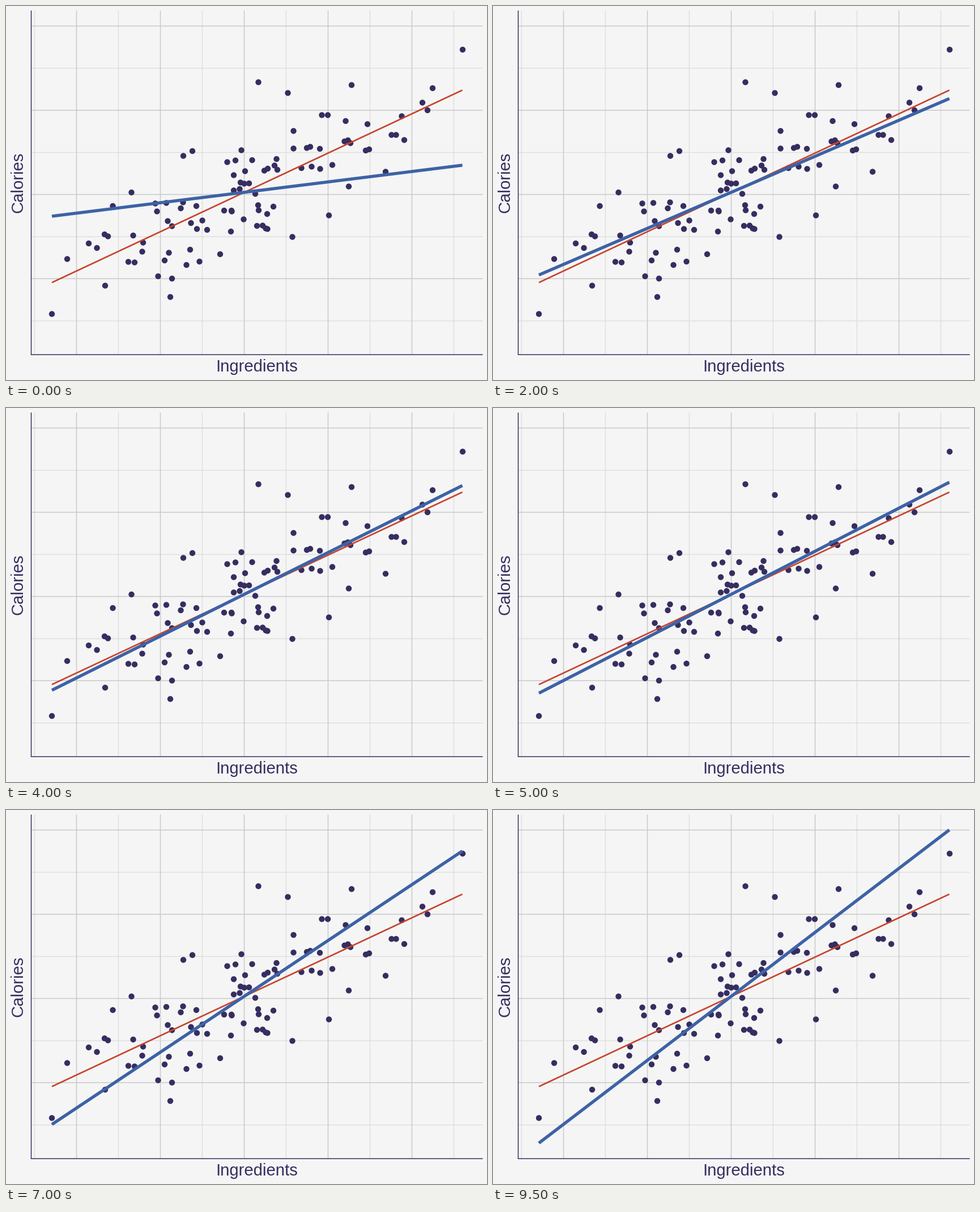
Write a matplotlib script that moves like this. It is 849 by 660 pixels and loops after 10000 ms.

```python
import matplotlib.pyplot as plt
from matplotlib.animation import FuncAnimation
from matplotlib.collections import PatchCollection
from matplotlib.patches import Circle

W, H, DPI = 849, 660, 72  # at 72 dpi one point is one pixel
PAPER, INK = "#f5f5f5", "#362d60"
MAJOR, MINOR = "#c9c9c9", "#dedede"
RED, BLUE = "#c8442e", "#3d62a6"

LEFT, RIGHT, TOP, BOTTOM = 44.5, 841.5, 8, 615.3
X0, X1 = 81, 805.5
PIVOT = 420.5, 328.8

# height of the blue line's right end at each step
STEPS = [281, 207.2, 191, 176.3, 163.4, 161.9, 153.9, 151.3, 136.9, 134.2,
         131, 131, 127.8, 86.8, 72.4, 67.7, 62.8, 41.5, 36.7, 35.1]

LOW = [
    (81, 543.5), (108, 446.5), (146, 419), (160.5, 427), (174, 403),
    (180, 406.5), (175, 493.5), (188.5, 353), (221.5, 329), (216, 451.5),
    (227, 452.5), (224.5, 405), (242, 417.5), (240.5, 433.5), (263.5, 348.5),
    (266.5, 362.5), (283, 347.5), (285.5, 379.5), (293, 388.5),
    (287.5, 435.5), (280, 449), (268.5, 477), (293, 481), (290, 513.5),
    (308.5, 357), (312.5, 346.5), (313, 264.5), (329, 256), (326.5, 383),
    (325, 430), (318.5, 457), (341.5, 451), (336, 353), (337, 393.5),
    (346.5, 378.5), (355, 395), (378, 438),
]
MID = [
    (385, 361), (398, 361), (398.5, 362.5), (397, 398), (390.5, 275.5),
    (405, 272.5), (402, 298.5), (402, 325.5), (412.5, 323), (414, 311.5),
    (420.5, 313.5), (429, 313), (422, 291.5), (415.5, 254.5), (434.5, 272),
    (440, 331.5), (445, 351.5), (446, 360.5), (419.5, 376.5), (443, 388),
    (453, 387.5), (458.5, 392.5), (461.5, 393.5), (461, 367), (472, 354),
    (456, 290.5), (462, 287), (474, 281.5), (477.5, 270), (479, 289),
    (445.5, 134.5), (497.5, 153.5), (505.5, 407.5), (507.5, 220.5),
    (507.5, 251.5), (521.5, 286), (531, 250.5), (537, 248.5),
    (539.5, 283.5), (554, 252), (554.5, 287.5),
]
HIGH = [
    (557.5, 192.5), (568, 192.5), (570, 369.5), (576, 280.5), (599.5, 203),
    (597.5, 239), (603.5, 237), (608, 242), (605, 318.5), (610, 139.5),
    (638, 208.5), (635, 255), (641, 253), (670, 292.5), (680.5, 227.5),
    (688.5, 227.5), (698.5, 194.5), (703, 236.5), (735, 170.5), (744, 184),
    (753, 145), (806, 77),
]

fig = plt.figure(figsize=(W / DPI, H / DPI), dpi=DPI, facecolor=PAPER)
ax = fig.add_axes([0, 0, 1, 1])
ax.set(xlim=(0, W), ylim=(H, 0))
ax.axis("off")


def line(xs, ys, color, width, z):
    return ax.plot(xs, ys, color=color, lw=width, zorder=z, snap=False,
                   solid_capstyle="butt")[0]


def label(x, y, text, angle=0):
    ax.text(x, y, text, color=INK, fontsize=29.3, family="Liberation Sans",
            ha="center", va="baseline", rotation=angle,
            rotation_mode="anchor")


def grid(color, width, x_start, y_start, z):
    for i in range(6):
        x = x_start + 148 * i
        if x < LEFT + 797:
            line([x, x], [TOP, BOTTOM], color, width, z)
    for i in range(4):
        y = y_start + 148.6 * i
        line([LEFT, RIGHT], [y, y], color, width, z)


grid(MINOR, 1.4, 50.4, 109.9, 1)
grid(MAJOR, 1.5, 124.5, 35.4, 2)
line([LEFT, LEFT], [TOP, BOTTOM], INK, 1.5, 3)
line([LEFT - 0.7, RIGHT], [BOTTOM, BOTTOM], INK, 1.5, 3)

dots = [Circle(p, 5.2) for p in LOW + MID + HIGH]
ax.add_collection(PatchCollection(dots, facecolor=INK, edgecolor="none",
                                  zorder=4))
line([X0, X1], [488, 148.5], RED, 2.7, 5)
fit = line([X0, X1], [0, 0], BLUE, 5.5, 6)

label(442.5, 645, "Ingredients")
label(29.5, 311.5, "Calories", 90)


def update(i):
    px, py = PIVOT
    slope = (py - STEPS[i]) / (X1 - px)
    fit.set_ydata([py - slope * (x - px) for x in (X0, X1)])
    return [fit]


anim = FuncAnimation(fig, update, frames=len(STEPS), interval=500,
                     repeat=True, repeat_delay=0)
plt.show()
```
